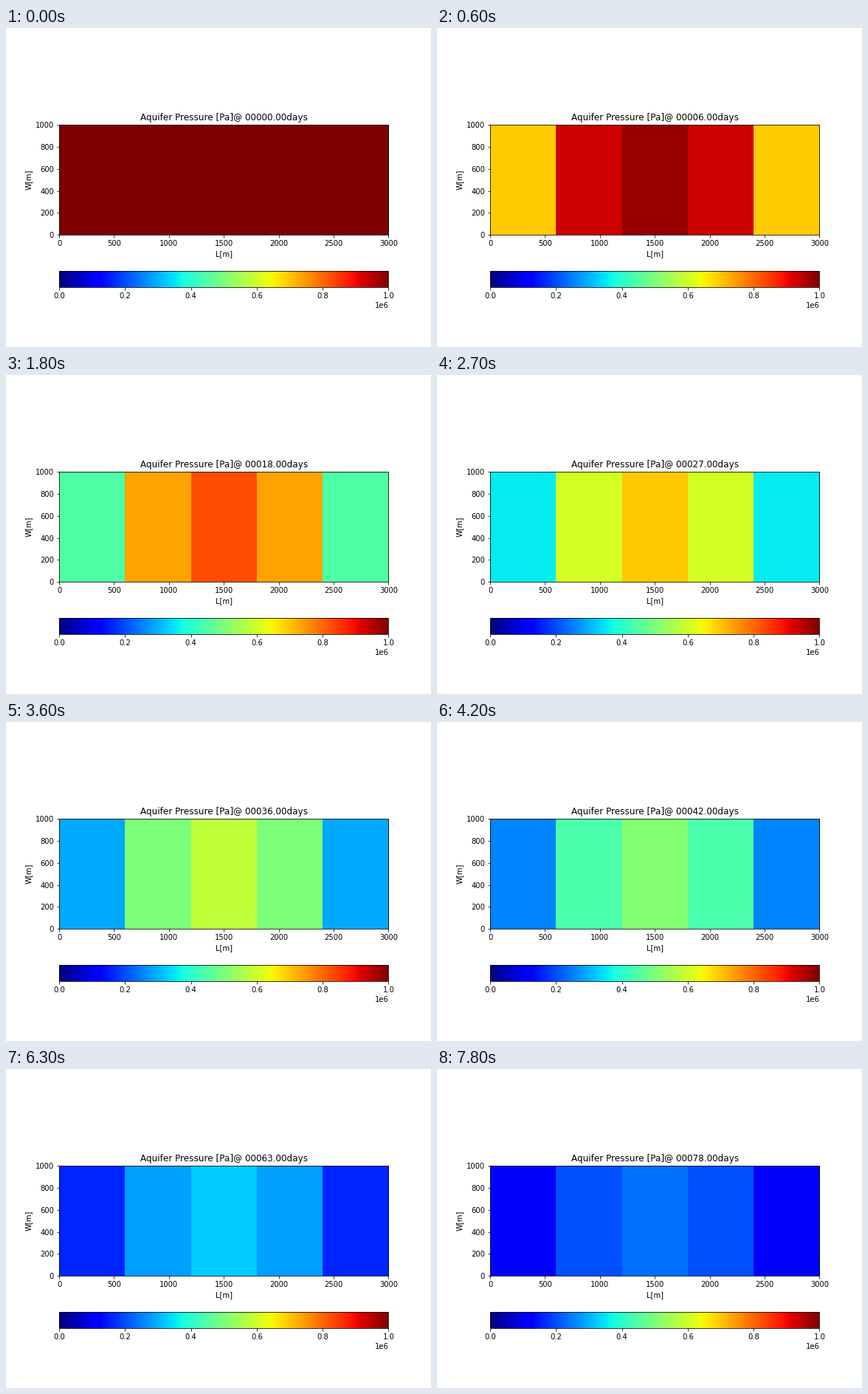
Animation, 576 px wide and 432 px high, one loop 8 s. Source, as a matplotlib script:

```python
import numpy as np
import matplotlib.pyplot as plt
from matplotlib.animation import FuncAnimation

plt.rcParams["font.family"] = "DejaVu Sans"

INTERVAL = 100           # ms, one simulated day
FRAMES = 80
DAYS_SHOWN = 3           # the picture refreshes every third day
CELLS = 5
LENGTH, WIDTH = 3000, 1000
START_PRESSURE = 1e6
DIFFUSION = 0.08         # diffusivity * dt / dx**2 for one day


def simulate(days):
    """Implicit 1D diffusion between two drained ends."""
    neighbours = np.eye(CELLS, k=1) + np.eye(CELLS, k=-1)
    system = (1 + 2 * DIFFUSION) * np.eye(CELLS) - DIFFUSION * neighbours
    history = [np.full(CELLS, START_PRESSURE)]
    for _ in range(days):
        history.append(np.linalg.solve(system, history[-1]))
    return history


pressure = simulate(FRAMES)

fig, ax = plt.subplots(figsize=(8, 6), dpi=72, facecolor="white")
fig.subplots_adjust(left=0.125, right=0.9, bottom=0.125, top=0.88)
image = ax.imshow(pressure[0][np.newaxis], cmap="jet", vmin=0,
                  vmax=START_PRESSURE, extent=(0, LENGTH, 0, WIDTH),
                  interpolation="nearest")
ax.set_xlabel("L[m]")
ax.set_ylabel("W[m]")
title = ax.set_title("")
fig.colorbar(image, ax=ax, orientation="horizontal")


def update(frame):
    day = frame - frame % DAYS_SHOWN
    image.set_data(pressure[day][np.newaxis])
    title.set_text(f"Aquifer Pressure [Pa]@ {day:08.2f}days")
    return image, title


anim = FuncAnimation(fig, update, frames=FRAMES, interval=INTERVAL,
                     init_func=lambda: update(0), repeat=True, repeat_delay=0)
plt.show()
```
